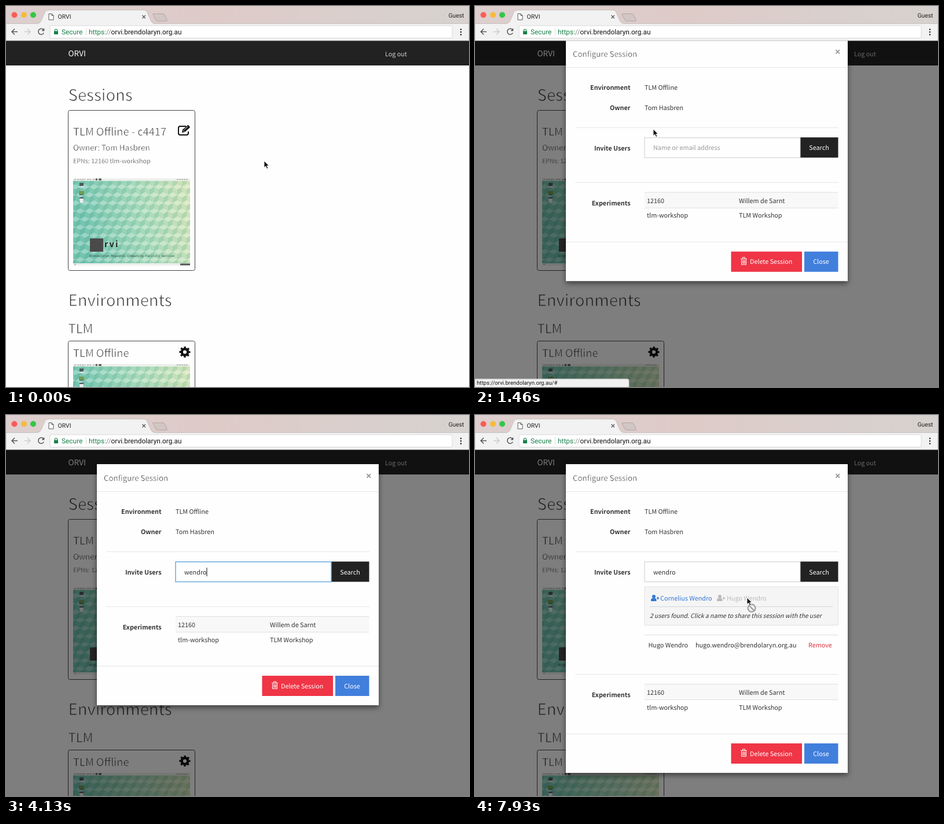
An HTML page that plays this animation: 800 by 659 pixels, repeating every 8 s.

```html
<!DOCTYPE html>
<html lang="en">
<head>
<meta charset="utf-8">
<title>Session sharing</title>
<style>
html, body { margin: 0; width: 100%; height: 100%; overflow: hidden; background: #fefefe; }
svg { display: block; width: 100vw; height: 100vh; }
text { font-family: "Noto Sans CJK JP", "Noto Sans CJK SC", "Noto Sans CJK", sans-serif; text-rendering: geometricPrecision; white-space: pre; }
.ui text { font-family: Roboto, sans-serif; }
/* A paper-coloured outline slims the regular weight to a light one. */
.light text, text.light { font-weight: 300; fill: #333; stroke: #fefefe; stroke-width: .032em; }
.modal { font-size: 10.8px; fill: #333; }
.label { font-weight: 700; text-anchor: end; }
.mid { text-anchor: middle; fill: #fff; }
.rule { stroke: #e6e6e6; }
#panel { filter: drop-shadow(0 4px 5px rgba(0,0,0,.5)); }
</style>
</head>
<body>
<svg viewBox="0 0 800 659" preserveAspectRatio="none">
  <defs>
    <linearGradient id="strip"><stop stop-color="#dccfce"/><stop offset=".45" stop-color="#decbc8"/><stop offset="1" stop-color="#d6d2cf"/></linearGradient>
    <linearGradient id="meadow" x2="1" y2="-.15"><stop stop-color="#78c6b2"/><stop offset=".5" stop-color="#abdcbd"/><stop offset="1" stop-color="#dbe7b9"/></linearGradient>
    <g id="cube">
      <path d="M8 0L16 4.67 8 9.33 0 4.67z" fill="#fff" fill-opacity=".25"/>
      <path d="M0 4.67L8 9.33V18.67L0 14z" fill="#167a68" fill-opacity=".03"/>
      <path d="M16 4.67L8 9.33V18.67L16 14z" fill="#0f8570" fill-opacity=".15"/>
    </g>
    <pattern id="cubes" width="16" height="28" patternUnits="userSpaceOnUse">
      <use href="#cube"/><use href="#cube" x="-8" y="14"/><use href="#cube" x="8" y="14"/>
      <use href="#cube" x="-8" y="-14"/><use href="#cube" x="8" y="-14"/>
    </pattern>
    <g id="desktop">
      <path d="M116 298h202v151H116z" fill="#edf0ec"/>
      <path d="M116 302.500h202V445H116z" fill="url(#meadow)"/>
      <path d="M116 302.500h202V445H116z" fill="url(#cubes)"/>
      <path d="M118 300h3m2 0h14m3 0h7m3 0h5m140 0h20M118 447h3" stroke="#888" stroke-dasharray="3 1"/>
      <path d="M155 298.500h3v3h-3zm5 0h5v3h-5zM301 445.500h17v3h-17z" fill="#555"/>
      <path d="M127 306h7v5h-7z" fill="#4c5a5a"/><path d="M126 312h9v2h-9z" fill="#dde"/>
      <path d="M126 320h9v6h-9z" fill="#6f9d52"/><path d="M127 326h7v1h-7z" fill="#456"/>
      <path d="M127 333h7l-1 7h-5z" fill="#eee"/><path d="M127 331h7v2h-7z" fill="#556"/>
      <rect x="145" y="402" width="23" height="23" fill="#4a4a4a"/>
      <g font-weight="700" fill="#1c2422"><text x="170" y="417" font-size="14.500" letter-spacing="2">rvi</text></g>
      <g fill="#34504a"><text x="144" y="433.500" font-size="5.200" style="font-family:'DejaVu Sans Mono',monospace">Brendolaryn Regional Computing Facility Service</text></g>
    </g>
    <g id="person">
      <circle cx="5" cy="3" r="3"/><path d="M0 11V9Q0 6 3 6h4q2.500 0 2.500 3v2zM10 5h1.300V3.500h1.400V5H14v1.500h-1.300V8h-1.400V6.500H10z"/>
    </g>
  </defs>

  <!-- page -->
  <path d="M0 60h800v599H0z" fill="#fefefe"/>
  <path d="M0 60h800v42.500H0z" fill="#222"/><path d="M0 102h800" stroke="#080808"/>
  <text x="107.500" y="87" font-size="13.500" fill="#fff">ORVI</text>
  <text x="655" y="86.500" font-size="10.800" fill="#ccc">Log out</text>
  <g fill="#fefefe" stroke="#444">
    <rect x="107.500" y="180.500" width="219" height="277" rx="3"/>
    <rect x="107.500" y="579.500" width="219" height="240" rx="3"/>
  </g>
  <g class="light">
    <text x="107.500" y="164" font-size="27.500">Sessions</text>
    <text x="107.500" y="519" font-size="27.500">Environments</text>
    <text x="107.500" y="565.500" font-size="22">TLM</text>
    <text x="116" y="224" font-size="18.300">TLM Offline - c4417</text>
    <text x="116" y="250" font-size="13.500">Owner: Tom Hasbren</text>
    <text x="116" y="272" font-size="10.700">EPNs: 12160 tlm-workshop</text>
    <text x="116" y="607" font-size="18.300">TLM Offline</text>
  </g>
  <use href="#desktop"/><use href="#desktop" y="321"/>
  <path d="M311 208H301q-3 0-3 3v9q0 3 3 3h11q3 0 3-3v-3" fill="none" stroke="#111" stroke-width="2"/>
  <path d="M304 219l1-5 9-8q2 0 4 4l-9 8z" fill="#111"/><path d="M306 215l2.500 2.500M308 214l6-5.500" stroke="#fff"/>
  <g fill="none" stroke="#111" stroke-width="4.400">
    <circle cx="309" cy="598.500" r="5.300"/><circle cx="309" cy="598.500" r="8" stroke-width="3.200" stroke-dasharray="3.142" stroke-dashoffset="1.571"/>
  </g>
  <path id="shade" d="M0 60h800v599H0z"/>

  <!-- dialog -->
  <g id="dialog" class="modal">
    <rect id="panel" x="157" y="85" width="487" height="417" fill="#fefefe"/>
    <text class="light" x="169" y="114" font-size="13.300">Configure Session</text>
    <path d="M623.500 102l6.500 6.500m0-6.500l-6.500 6.500" stroke="#999" stroke-width="1.800"/>
    <path class="rule" d="M157 132.500h487M173 236.500h455"/>
    <g class="label"><text x="268.500" y="171">Environment</text><text x="268.500" y="206">Owner</text><text x="268.500" y="276">Invite Users</text></g>
    <text x="293" y="171">TLM Offline</text><text x="293" y="206">Tom Hasbren</text>
    <path id="search" d="M562 253.500h65.500v35H562z"/>
    <text class="mid" x="594.500" y="275.500">Search</text>
    <rect id="field" x="293" y="254" width="269" height="34.500" fill="#fefefe"/>
    <text id="query" x="308" y="275.500"></text>
    <path id="caret" d="M.5 264v15" stroke="#111"/>
    <g id="results">
      <path d="M293 297h334.500v66.500H293z" fill="#f5f5f5" stroke="#e0e0e0"/>
      <use href="#person" x="304" y="311" fill="#3277d8"/><text x="320" y="321" fill="#3277d8">Cornelius Wendro</text>
      <g id="guest"><use href="#person" x="418" y="311"/><text x="435" y="321">Hugo Wendro</text></g>
      <path d="M302 331.500h316" stroke="#d0d4dc"/>
      <text x="302" y="351" font-size="10.400" font-style="italic">2 users found. Click a name to share this session with the user</text>
    </g>
    <g id="shared">
      <path d="M293 380.500h334.500" stroke="#ddd"/>
      <text x="299.500" y="402">Hugo Wendro</text><text x="381" y="402">hugo.wendro@brendolaryn.org.au</text>
      <text x="576" y="402" fill="#dd3340">Remove</text>
    </g>
    <g id="lower">
      <path class="rule" d="M173 331.500h455M157 434.500h487"/>
      <text class="label" x="268.500" y="371">Experiments</text>
      <path d="M293 349h334.500v26H293z" fill="#f8f8f9"/><path d="M293 348.500h334.500M293 375.500h334.500" stroke="#dfdfdf"/>
      <text x="297" y="367">12160</text><text x="456" y="367">Willem de Sarnt</text>
      <text x="297" y="392.500">tlm-workshop</text><text x="456" y="392.500">TLM Workshop</text>
      <path d="M442.500 451H565v35H442.500z" fill="#ef3546"/><path d="M569 451h58.500v35H569z" fill="#417fdc"/>
      <path d="M459 463.500h11M462.500 463v-2h4v2M460.500 464.500v9h8v-9M462.700 465.500v6.500m1.900-6.500v6.500m1.900-6.500v6.500" fill="none" stroke="#fff"/>
      <text x="475" y="472.500" fill="#fff">Delete Session</text><text class="mid" x="598" y="472.500">Close</text>
    </g>
  </g>

  <!-- browser -->
  <g class="ui" fill="#222">
    <path d="M0 0h800v31H0z" fill="url(#strip)"/>
    <circle cx="14.500" cy="15.500" r="5" fill="#fc5b57"/><circle cx="31" cy="15.500" r="5" fill="#f5bb3c"/><circle cx="47" cy="15.500" r="5" fill="#35c648"/>
    <path d="M254 13.500h17q2 0 3 2l4 8q1 2.500-1 2.500h-15q-2 0-3-2l-5-9z" fill="#d1c6c3" stroke="#b0a5a2"/>
    <path d="M0 30.500H54Q59 30 61 25L67 11q2-4 6-4H238q4 0 6 4l6 14q2 5 7 5.500H800V60H0z" fill="#f2f2f2" stroke="#bbb3b1" stroke-width=".7"/>
    <path d="M74 13.500h5l3 3V24h-8zM79 13.500v3h3" fill="#fff" stroke="#555"/>
    <text x="89.500" y="22" font-size="10.500">ORVI</text>
    <path d="M235.500 16l5.500 5.500m0-5.500l-5.500 5.500" stroke="#555" stroke-width="1.200"/>
    <text x="791.500" y="20" font-size="10.400" text-anchor="end">Guest</text>
    <path d="M0 59.500h800" stroke="#d8d8d8"/>
    <g fill="none" stroke="#555" stroke-width="1.500">
      <path d="M20 44.500H10m5-5l-5 5 5 5M65 41.500a5 5 0 1 0 .3 5M65.500 39v3.500H62"/>
      <path d="M32 44.500h10m-5-5l5 5-5 5" stroke="#ccc"/>
    </g>
    <rect x="76" y="34" width="695" height="21.500" rx="2.500" fill="#fff" stroke="#d8d8d8"/>
    <path d="M83 43.500h7v5.500h-7z" fill="#188048"/><path d="M84.500 44v-2q0-2 2-2t2 2v2" fill="none" stroke="#188048" stroke-width="1.200"/>
    <g font-size="11.900" fill="#111">
      <text x="96" y="49" fill="#188048">Secure</text>
      <text x="143" y="49"><tspan fill="#188048">https:</tspan><tspan fill="#888">//</tspan>orvi.brendolaryn.org.au</text>
    </g>
    <path d="M138.500 38v13" stroke="#ddd"/>
    <circle cx="786" cy="40.500" r="1.300"/><circle cx="786" cy="45" r="1.300"/><circle cx="786" cy="49.500" r="1.300"/>
    <g id="status">
      <path d="M-1 645h264q3 0 3 3v12H-1z" fill="#f1f1f1" stroke="#bbb"/>
      <text x="3" y="655" font-size="9.600" fill="#111">https://orvi.brendolaryn.org.au/#</text>
    </g>
  </g>

  <g id="pointer">
    <g id="blocked"><circle cx="8" cy="18" r="6.500" fill="#eee" stroke="#999" stroke-width="2"/><path d="M3.500 13.500l9 9" stroke="#999" stroke-width="2"/></g>
    <path id="arrow" d="M0 0V11.500L2.700 9 4.800 13.500 6.800 12.500 4.800 8.300H8.300z" fill="#111" stroke="#fff" stroke-width=".8"/>
    <path id="hand" d="M-1 0q1.500-1 2 1l.5 4 5 1.500q1.500.5 1 3L6.500 14H0L-4 8.500q-.5-2 1-1.500L-1 8.500z" fill="#fff" stroke="#111" stroke-width="1.100"/>
    <path id="ibeam" d="M-2.500-6.500Q0-6.500 0-5V6Q0 7.500-2.500 7.500M2.500-6.500Q0-6.500 0-5M0 6Q0 7.500 2.500 7.500M-1.500 2h3" fill="none" stroke="#111" stroke-width="1.300"/>
  </g>
</svg>
<script>
const LOOP = 8000, STEP = 1000 / 15;
const OPEN = 1300, FOCUS = 2500, TYPE = 3000, KEY = 150, SEARCH = 5700, FOUND = 5930, SHARE = 7300;
const QUERY = 'wendro';
const path = [[250, 446, 268], [900, 308, 213], [1500, 308, 213], [1950, 357, 271],
  [4400, 357, 271], [5100, 581, 277], [6200, 581, 277], [6900, 470, 316]];
const shapes = [[0, 'arrow'], [870, 'hand'], [1330, 'arrow'], [1850, 'ibeam'], [2900, ''],
  [4400, 'ibeam'], [5050, 'hand'], [6250, 'arrow'], [6800, 'hand'], [SHARE, 'blocked']];

const $ = id => document.getElementById(id);
const set = (id, attrs) => { for (const k in attrs) $(id).setAttribute(k, attrs[k]); };
const show = (id, on) => { $(id).style.display = on ? '' : 'none'; };
const clamp = v => Math.min(1, Math.max(0, v));

function pointerAt(t) {
  const i = path.findIndex(p => p[0] > t);
  if (i === 0) return path[0].slice(1);
  if (i < 0) return path[path.length - 1].slice(1);
  const [a, b] = [path[i - 1], path[i]];
  const u = (t - a[0]) / (b[0] - a[0]), e = u * u * (3 - 2 * u);
  return [1, 2].map(k => a[k] + (b[k] - a[k]) * e);
}

function draw(t) {
  // The backdrop fades while the dialog drops in from a quarter of its height.
  const fade = clamp((t - OPEN) / 150);
  const drop = -104 * (1 - clamp((t - OPEN) / 300)) ** 1.7;
  set('shade', { opacity: fade * .5 });
  set('dialog', { opacity: fade, transform: `translate(0 ${drop})` });

  const grow = t >= SHARE ? 117 : t >= FOUND ? 75 : 0;
  set('panel', { height: 417 + grow });
  set('lower', { transform: `translate(0 ${grow})` });
  show('results', t >= FOUND);
  show('shared', t >= SHARE);
  set('guest', { fill: t >= SHARE ? '#bbb' : '#3277d8' });

  const focused = t >= FOCUS && t < SEARCH;
  const typed = QUERY.slice(0, Math.max(0, Math.ceil((t - TYPE) / KEY)));
  set('field', { stroke: focused ? '#73aee0' : '#ccc', 'stroke-width': focused ? 1.6 : 1 });
  set('query', { fill: typed ? '#333' : '#999' });
  $('query').textContent = typed || 'Name or email address';
  const caretX = 308 + (typed ? $('query').getComputedTextLength() : 0);
  const lastKey = t < TYPE ? FOCUS : TYPE + KEY * Math.min(QUERY.length - 1, Math.floor((t - TYPE) / KEY));
  set('caret', { transform: `translate(${caretX} 0)` });
  show('caret', focused && Math.floor((t - lastKey) / 500) % 2 === 0);
  set('search', { fill: t >= 5050 && t < 6250 ? '#050505' : '#222' });
  show('status', t >= 870 && t < 1600);

  const shape = shapes.filter(s => s[0] <= t).pop()[1];
  for (const id of ['hand', 'ibeam', 'blocked']) show(id, id === shape);
  show('arrow', shape === 'arrow' || shape === 'blocked');
  set('pointer', { transform: `translate(${pointerAt(t)})` });
}

function tick() {
  const t = performance.now() % LOOP;
  draw(Math.floor((t + 7) / STEP) * STEP);
  requestAnimationFrame(tick);
}
tick();
</script>
</body>
</html>
```
